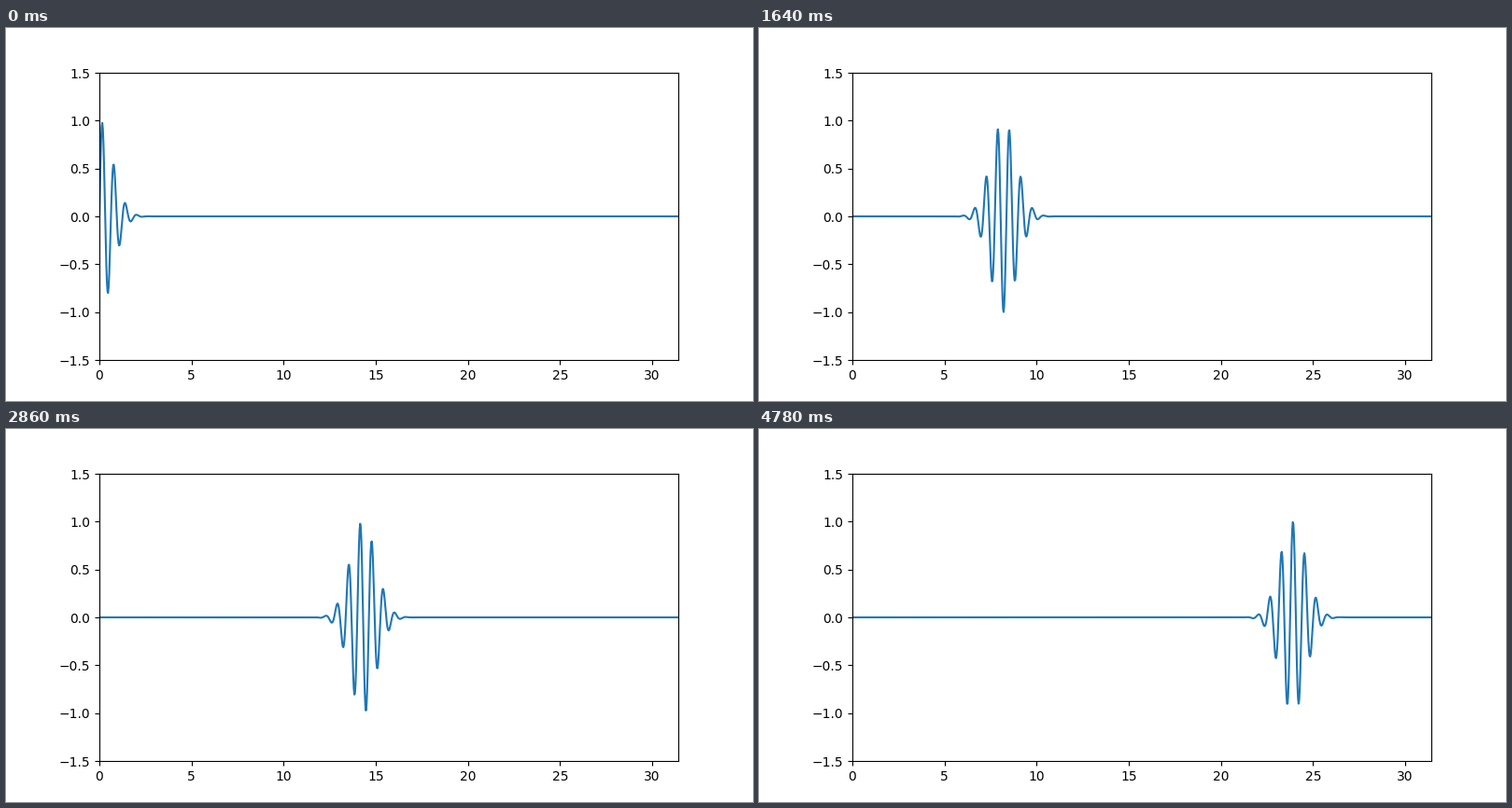
Animation of 800 by 400 pixels, one loop 4800 ms. Source, as a matplotlib script:

```python
import numpy as np
import matplotlib.pyplot as plt
from matplotlib.animation import FuncAnimation

FRAMES = 240
INTERVAL = 20  # ms
STEP = 0.1  # time units per frame

x = np.linspace(0, 10 * np.pi, 1000)


def packet(t):
    """Gaussian envelope at speed 1 over a carrier wave at phase speed 0.1."""
    return np.exp(-(x - t) ** 2) * np.sin(10 * x - t)


fig, ax = plt.subplots(figsize=(8, 4), dpi=100)
ax.set_xlim(0, 10 * np.pi)
ax.set_ylim(-1.5, 1.5)
line, = ax.plot(x, packet(0))


def update(i):
    line.set_ydata(packet(STEP * i))
    return line,


anim = FuncAnimation(fig, update, frames=FRAMES, interval=INTERVAL,
                     repeat=True, repeat_delay=0)
plt.show()
```
